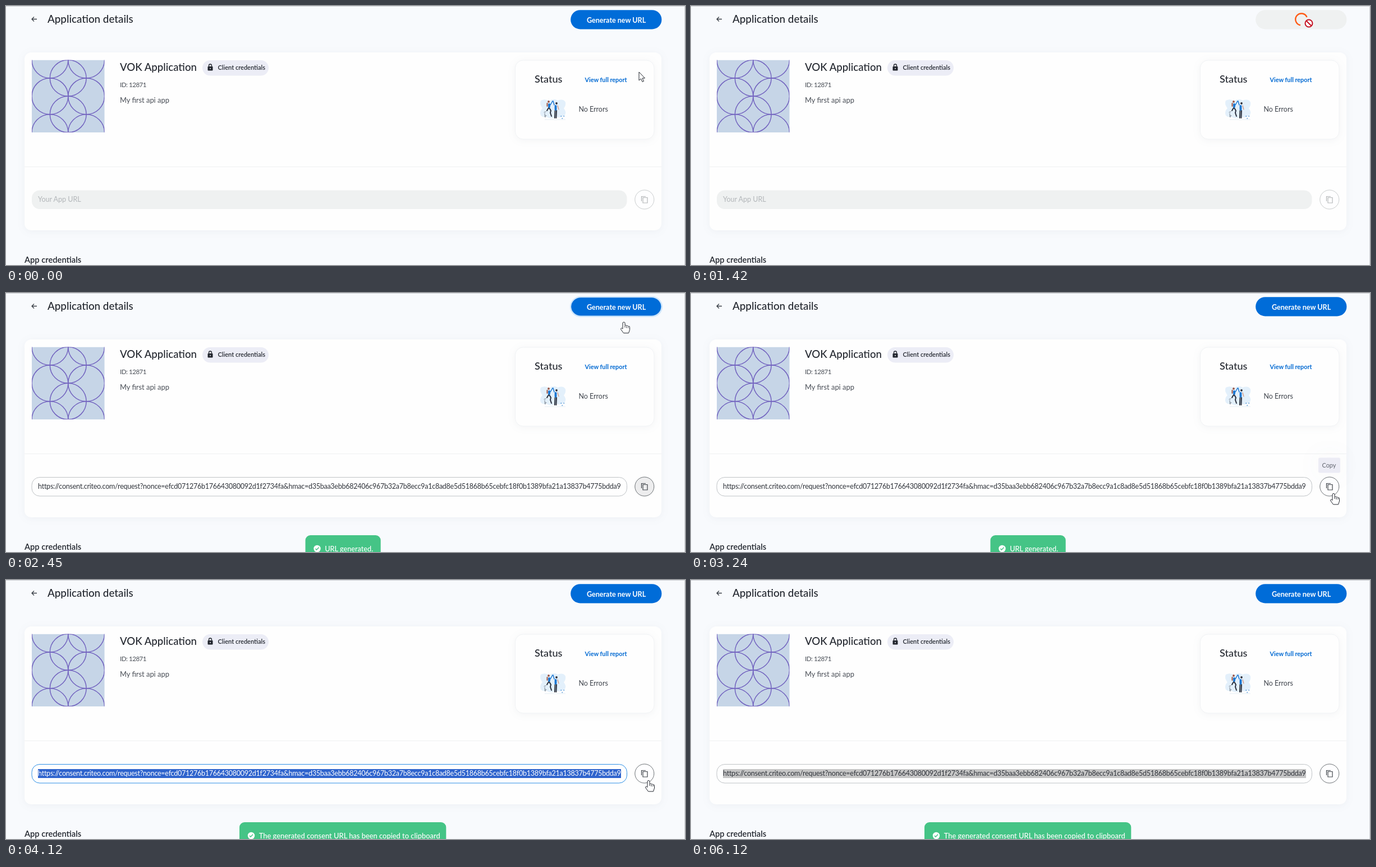
An HTML page for the animation above (6190 ms loop, 1210 px wide and 463 px high).

```html
<!DOCTYPE html>
<html lang="en">
<head>
<meta charset="utf-8">
<title>Application details</title>
<style>
  html, body { margin: 0; width: 100%; height: 100%; overflow: hidden; background: #f8fafd; }
  svg { display: block; width: 1210px; height: 463px; font-family: Lato, "Open Sans", sans-serif; fill: #23272f; }
  .medium { font-weight: 500; }
  .semi { font-weight: 600; }
  .bold { font-weight: 700; }
  .line { fill: none; }
  #url { font-size: 12.5px; letter-spacing: -.245px; }
  .soft { filter: drop-shadow(0 2px 7px rgba(60, 80, 110, .06)); }
  .glow { filter: drop-shadow(0 0 20px rgba(60, 80, 110, .05)); }
</style>
</head>
<body>
<svg viewBox="0 0 1210 463">
  <path class="line" d="M0 .5H1209.5V463" stroke="#cfd2d6"/>
  <path class="line" d="M55 23.500H46M50 19.500L46 23.500 50 27.500" stroke="#3b4048" stroke-width="1.300"/>
  <text class="medium" x="74" y="30" font-size="18.800">Application details</text>
  <text class="semi" x="33" y="458.500" font-size="14.700">App credentials</text>

  <rect id="ring" x="1005" y="6" width="165" height="37" rx="18.500" fill="#cde5fb"/>
  <rect id="button" rx="17" fill="#006cd8"/>
  <text id="label" class="bold" x="1035" y="29.500" font-size="12.550" fill="#fff">Generate new URL</text>
  <path id="spinner" class="line" d="M1086 34.300A10.500 10.500 0 1 1 1097.500 20" stroke="#ff5a14" stroke-width="2.400"/>

  <rect class="soft" x="33" y="83" width="1135" height="318" rx="12" fill="#fefefe"/>
  <path d="M33 287.500H1168" stroke="#eff1f2"/>

  <svg x="46" y="96.500" width="129.500" height="129.500">
    <rect width="130" height="130" fill="#c6d5e7"/>
    <g id="circles" class="line" stroke="#7263bf" stroke-width="1.500"></g>
  </svg>

  <text class="medium" x="203" y="116" font-size="18.600">VOK Application</text>
  <rect x="350" y="97" width="118" height="27.500" rx="13.700" fill="#ecedf6"/>
  <rect x="359.500" y="108" width="9" height="7.500" rx="1"/>
  <path class="line" d="M361.500 108V106.500a2.500 2.500 0 0 1 5 0V108" stroke="#23272f" stroke-width="1.300"/>
  <circle cx="364" cy="111.700" r="1" fill="#ecedf6"/>
  <text class="semi" x="377.500" y="114" font-size="11">Client credentials</text>
  <g fill="#4a4f57">
    <text x="203" y="145" font-size="11.600" letter-spacing="-.5">ID: 12871</text>
    <text x="203" y="172.500" font-size="12.900">My first api app</text>
  </g>

  <rect class="soft" x="907.500" y="97" width="247.500" height="141" rx="14" fill="#fefefe" stroke="#f0f2f4"/>
  <text class="medium" x="942" y="137" font-size="18.100">Status</text>
  <text class="bold" x="1031.500" y="135.500" font-size="10.800" fill="#0069d2">View full report</text>
  <text x="1020.500" y="188.500" font-size="12.450" fill="#3f444c">No Errors</text>

  <path d="M953 169q8-4 15 1 8-6 15-1 10-4 14 3 1 6-3 11 6 7 1 13-7 5-14 2-10 5-18 0-10 2-11-6 0-6 4-9-6-8-3-14z" fill="#e3f0fb"/>
  <path d="M960 203H997" stroke="#e4edf4"/>
  <g class="line" stroke-linecap="round" stroke-linejoin="round">
    <path d="M968 182L971 187 970 191 972 197M967 182L964 187" stroke="#252b38" stroke-width="1.900"/>
    <path d="M978.500 187L978 200M981 187L980.500 200" stroke="#252b38" stroke-width="1.900"/>
    <path d="M970 177L974 170M977 177L975 170" stroke="#1976d2" stroke-width="1.500"/>
    <path d="M968 176L968 180M979.500 179V185" stroke="#1976d2" stroke-width="3.800"/>
    <path d="M964.500 174V179" stroke="#a8604f" stroke-width="2.200"/>
    <path d="M983 178L985 185" stroke="#d59279" stroke-width="1.200"/>
    <path d="M960 192L961 199M962 189L959 190M963 196L960 197" stroke="#59616d" stroke-width=".8"/>
    <path d="M989 197h.5M991 201h.5M994 197h.5" stroke="#3786cf" stroke-width="1.400"/>
  </g>
  <circle cx="967" cy="171" r="1.900" fill="#9b5748"/>
  <circle cx="981" cy="174" r="1.900" fill="#32323c"/>

  <rect id="field" x="46" y="329.500" width="1060.500" height="33.500" rx="14"/>
  <text id="hint" x="57" y="350" font-size="12.500" fill="#b2b6b9">Your App URL</text>
  <rect id="selection" x="57" y="338" width="1039" height="16"/>
  <text id="url" x="57" y="350">https://consent.criteo.com/request?nonce=efcd071276b176643080092d1f2734fa&amp;hmac=d35baa3ebb682406c967b32a7b8ecc9a1c8ad8e5d51868b65cebfc18f0b1389bfa21a13837b4775bdda9</text>

  <g id="copy" class="line">
    <circle id="disc" cx="1137.800" cy="346" r="17"/>
    <path d="M1132.500 349V340.500H1140M1135 342.500H1143V352H1135Z" stroke-width="1.200"/>
  </g>
  <g id="tip">
    <rect class="glow" x="1118" y="294.500" width="39" height="27" rx="3" fill="#ececf5"/>
    <text x="1124.500" y="312" font-size="10.900" fill="#62666f">Copy</text>
  </g>

  <g id="toast1"></g>
  <g id="toast2"></g>

  <g id="cursor" stroke="#23272f" stroke-width="1" stroke-linejoin="round" fill="#fff">
    <path id="arrow" d="M0 0V15L3.500 12 6 17.500 8.500 16.500 6 11H10.500Z"/>
    <path id="hand" d="M-2 1.500Q0-1 2 1.500V6.500Q4 5 5 7 7 6 8 8 10.500 7 10.500 10V14L8.500 20H-.5L-5.500 13Q-5 9.500-2 12.500ZM2 7V10M5 8V11M8 9V11"/>
    <g id="blocked" stroke="#c40f20" stroke-width="2">
      <circle cx="1" cy="6" r="6.500"/><path d="M-3.500 1.500L5.500 10.500"/>
    </g>
  </g>
</svg>

<script>
const LOOP = 6190;
const $ = id => document.getElementById(id);
const set = (id, attrs) => {
  for (const name in attrs) $(id).setAttribute(name, attrs[name]);
};
const ramp = (v, a, b) => Math.min(1, Math.max(0, (v - a) / (b - a)));
// Share done of n evenly spaced picture changes between a and b.
const stepped = (t, a, b, n) =>
  t < a ? 0 : Math.min(n, Math.floor((t - a) / (b - a) * (n - 1) + 1e-6) + 1) / n;
const grey = v => `rgb(${v},${v},${v + 1})`;

for (let row = 0; row < 5; row++)
  for (const x of row % 2 ? [64.7] : [32.4, 97.1])
    $('circles').innerHTML += `<circle cx="${x}" cy="${row * 32.4}" r="32.4"/>`;

function makeToast(id, x, width, text, size) {
  $(id).innerHTML = `<rect x="${x}" y="433" width="${width}" height="48" rx="9" fill="#45c486"/>
    <circle cx="${x + 21}" cy="457" r="6.2" fill="#fff"/>
    <path class="line" d="M${x + 18} 457l2 2.2 4-4.4" stroke="#45c486" stroke-width="1.5"/>
    <text class="medium" x="${x + 34.7}" y="461.500" font-size="${size}" fill="#fff">${text}</text>`;
}
makeToast('toast1', 533.5, 134.2, 'URL generated.', 12.7);
makeToast('toast2', 416, 368.3, 'The generated consent URL has been copied to clipboard', 12.9);

function showToast(id, enter, opacity) {
  const s = .8 + .2 * enter;
  set(id, { opacity, transform: `translate(600 457) scale(${s}) translate(-600 -457)` });
}

function draw(t) {
  const approach = stepped(t, 70, 610, 9);
  const send = stepped(t, 870, 1420, 9);
  const reply = stepped(t, 1600, 2060, 8);
  const travel = stepped(t, 2450, 3040, 10);
  const click = stepped(t, 3710, 4120, 7);
  const leave = stepped(t, 5510, 5720, 4);
  const loading = send > .3 && !reply;
  const ready = reply > 0;
  const clicked = click > 0;
  const blurred = t >= 6120;

  // Pointer
  const go = ramp(1.3 * travel - .05, 0, 1);
  const x = travel ? 1100 + 45 * go ** 1.5 : 1128 - 28 * approach;
  const y = travel ? 25 + 333 * go + 120 * leave : 118 - 93 * approach;
  const overCopy = y > 329 && y < 363;
  const kind = loading ? 'blocked' : y < 55 || overCopy ? 'hand' : 'arrow';
  set('cursor', { transform: `translate(${x} ${y})` });
  for (const id of ['arrow', 'hand', 'blocked'])
    set(id, { visibility: id === kind ? 'visible' : 'hidden' });

  // Generate button
  const ring = loading ? 0 : ramp(approach, .75, 1) * (1 - ramp(travel, .1, .5));
  set('ring', { opacity: ring });
  set('button', {
    x: 1006.2 + ring, y: 7.2 + ring, width: 162.2 - 2 * ring, height: 34.2 - 2 * ring,
    fill: loading ? '#eff1f1' : '#006cd8'
  });
  set('label', { opacity: loading ? 0 : 1 });
  set('spinner', { opacity: loading ? 1 : 0, transform: `rotate(${(send - 1) * 560} 1087.500 24)` });

  // Address field
  set('field', {
    fill: ready ? '#fefefe' : '#eff1f1',
    stroke: !ready ? 'none' : clicked && !blurred ? '#2c8fe6' : '#bfc3c6'
  });
  set('hint', { opacity: ready ? 0 : 1 });
  set('selection', { opacity: clicked ? 1 : 0, fill: blurred ? '#c6c6c6' : '#2f64cd' });
  set('url', { opacity: ready ? 1 : 0, fill: clicked && !blurred ? '#fff' : '#30343b' });

  // Copy button and its tooltip
  const press = Math.min(ramp(click, 0, .42), 1 - ramp(click, .5, 1));
  const rest = ramp(reply, 0, .5) * (1 - ramp(travel, .75, 1));
  set('copy', { stroke: ready ? '#3f444a' : '#b3b6b8' });
  set('disc', { fill: grey(Math.round(254 - 17 * rest - 42 * press)), stroke: ready ? '#6b7074' : '#c9cccd' });
  set('tip', { opacity: ramp(travel, .75, 1) * (1 - ramp(click, .45, .8)) });

  // Messages
  const enter1 = ramp(reply, .2, .8);
  const enter2 = ramp(click, .65, 1);
  showToast('toast1', enter1, enter1 * (1 - ramp(click, .4, .75)));
  showToast('toast2', enter2, enter2);
}

function frame(now) {
  draw(now % LOOP);
  requestAnimationFrame(frame);
}
requestAnimationFrame(frame);
</script>
</body>
</html>
```
